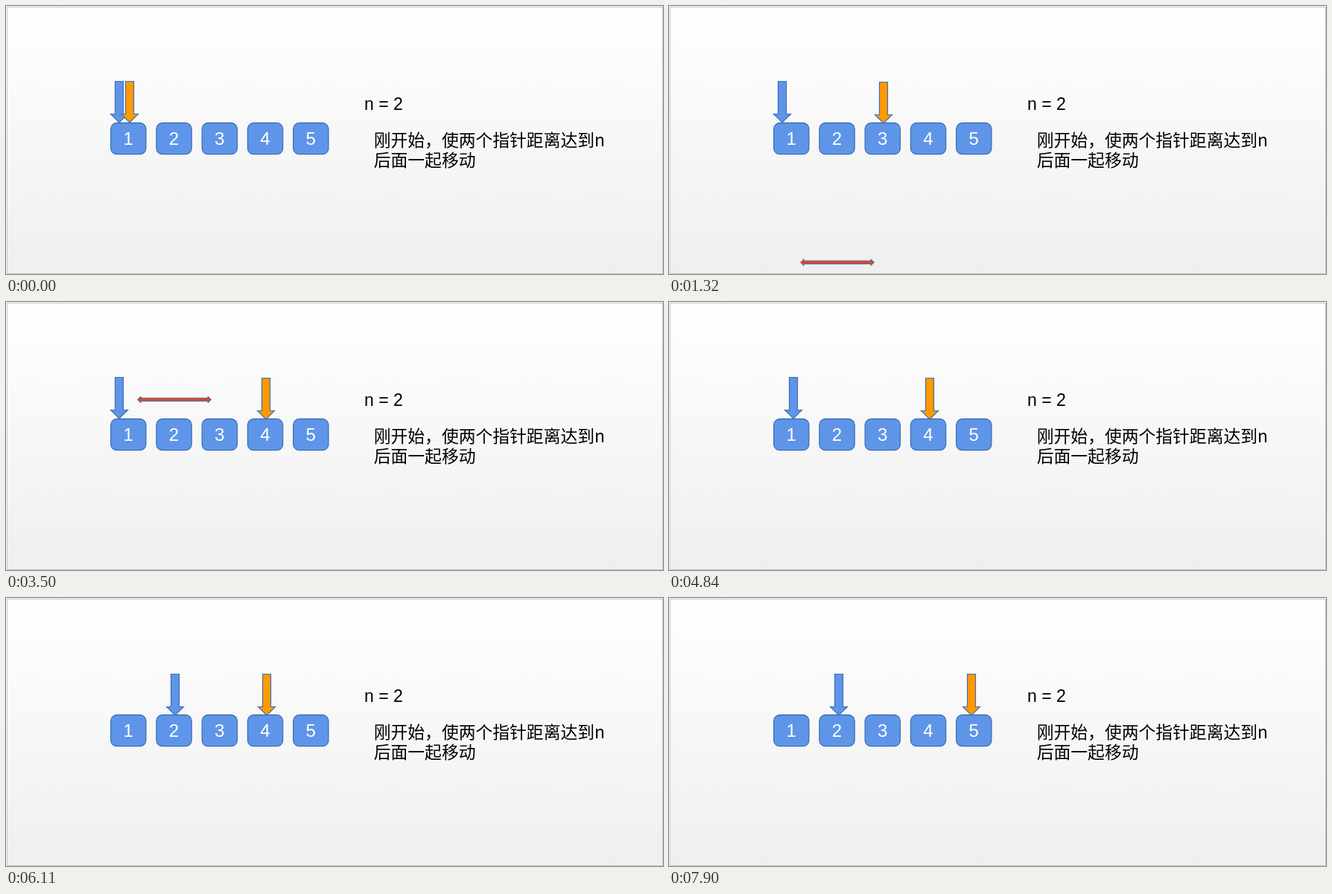
An HTML page that plays this animation: 882 by 361 pixels, repeating every 7990 ms.

```html
<!DOCTYPE html>
<html lang="zh">
<head>
<meta charset="utf-8">
<title>双指针</title>
<style>
  html, body { margin: 0; width: 100%; height: 100%; overflow: hidden; background: #fff; }
  svg { display: block; }
  text { font: 23px "Liberation Sans", Arial, sans-serif; }
  .cjk { font: 22.8px "Noto Sans CJK SC", "Noto Sans CJK", sans-serif; }
  .digit { font-size: 24px; fill: #fff; text-anchor: middle; }
  .node { fill: #5f95e8; stroke: #3d70b4; stroke-width: 1.3; }
  .pointer { stroke: #3d70b4; stroke-width: 1.2; }
</style>
</head>
<body>
<svg width="882" height="361" viewBox="0 0 882 361">
  <defs>
    <linearGradient id="paper" x1="0" y1="0" x2="0" y2="1">
      <stop offset="0" stop-color="#fff"/>
      <stop offset="1" stop-color="#efefef"/>
    </linearGradient>
    <path id="arrow" d="M-5.5 0H5.5V44H11.5L0 55.5L-11.5 44H-5.5Z"/>
  </defs>
  <rect x="1.5" y="1.5" width="880" height="359" fill="url(#paper)" stroke="#c6c6c6"/>
  <g id="nodes"></g>
  <text x="481" y="140">n = 2</text>
  <text class="cjk" x="493.7" y="188.6">刚开始，使两个指针距离达到n</text>
  <text class="cjk" x="493.7" y="216.4">后面一起移动</text>
  <use id="slow" class="pointer" href="#arrow" fill="#5f95e8"/>
  <use id="fast" class="pointer" href="#arrow" fill="#ff9900"/>
  <path id="gap" d="M176.5 0L181 -4.5V-2.2H271V-4.5L275.5 0L271 4.5V2.2H181V4.5Z" fill="#d9472f" stroke="#41719c" stroke-width=".9"/>
</svg>
<script>
const LOOP = 7990;
const byId = id => document.getElementById(id);

byId('nodes').innerHTML = [1, 2, 3, 4, 5].map((n, i) => {
  const x = 140.7 + 61.25 * i;
  return `<rect class="node" x="${x}" y="157.5" width="47.2" height="42.2" rx="8"/>
    <text class="digit" x="${x + 23.6}" y="186.7">${n}</text>`;
}).join('');

// Each move: start time, duration, from [x, y], to [x, y].
const fastMoves = [
  [-40, 1100, [166, 101.5], [288, 102.5]],
  [1555, 2055, [288, 100.5], [349.5, 102.5]],
  [6305, 2000, [349.5, 101.5], [410.6, 102.5]]
];
const slowMoves = [[4212, 2000, [152, 101.5], [227.5, 102.5]]];

const progress = (t, start, duration) => Math.min(1, Math.max(0, (t - start) / duration));
const ease = u => u < 0.5 ? 2 * u * u : 1 - 2 * (1 - u) ** 2;
const mix = (a, b, p) => a + (b - a) * p;

function placePointer(id, moves, t) {
  const [start, duration, from, to] = moves.filter(m => m[0] <= t).pop() || moves[0];
  const p = ease(progress(t, start, duration));
  const x = Math.round(mix(from[0], to[0], p));
  const y = Math.round(mix(from[1], to[1], p) - 0.5) + 0.5;
  byId(id).setAttribute('transform', `translate(${x} ${y})`);
}

function render(t) {
  placePointer('slow', slowMoves, t);
  placePointer('fast', fastMoves, t);
  // The distance marker flies in from below, then drops out again.
  const shown = progress(t, 1298, 250) - progress(t, 3620, 320);
  byId('gap').setAttribute('transform', `translate(0 ${mix(367, 131.5, shown)})`);
}

const begin = performance.now();
function tick() {
  render((performance.now() - begin) % LOOP);
  requestAnimationFrame(tick);
}
tick();
</script>
</body>
</html>
```
